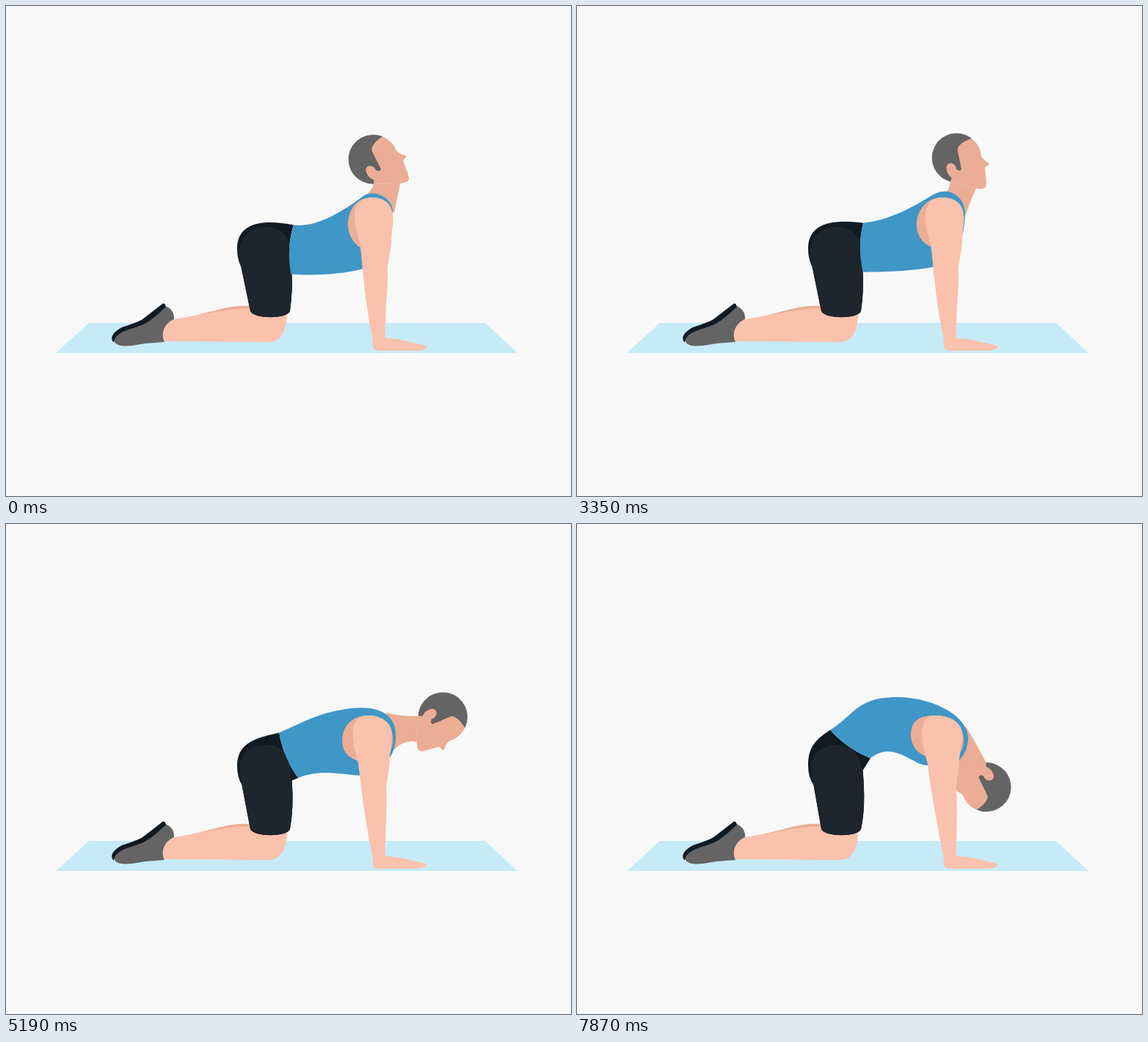
Animation of 770 by 668 pixels, one loop 8000 ms. Source, as an HTML page:

```html
<!DOCTYPE html>
<html lang="en">
<head>
<meta charset="utf-8">
<title>Back stretch</title>
<style>
  html, body { margin: 0; width: 100%; height: 100%; overflow: hidden; background: #f8f8f8; }
  svg { display: block; width: 100%; height: 100%; }
  .skin { fill: #fac1ac; }
  .shade { fill: #ebad95; }
  .grey { fill: #646464; }
  .dark { fill: #101a22; }
  .black { fill: #1c262c; }
  .blue { fill: #3f97c7; }
</style>
</head>
<body>
<svg viewBox="0 0 770 668" xmlns="http://www.w3.org/2000/svg">
  <rect width="770" height="668" fill="#f8f8f8"/>
  <path fill="#c6ebf7" d="M113 432H653L697 473H68Z"/>

  <!-- lower leg and shoe -->
  <path class="shade" d="M232 427C285 418 298 407 334 409V420Z"/>
  <path class="skin" d="M229 427C270 421 300 412 334 412L383 420C382 444 375 458 358 458L215 457C210 445 217 432 229 427Z"/>
  <path class="grey" d="M147 456C150 464 160 464 172 463L190 460L216 458C210 445 217 432 229 427C230 418 224 411 217 409C205 420 195 430 185 434C170 439 150 445 147 456Z"/>
  <path class="dark" d="M146 458C141 451 147 444 158 438C175 432 183 430 190 424L212 407Q216 403 218 410C205 422 195 431 185 435C170 441 149 444 147 458Z"/>

  <path id="shorts" class="dark"/>
  <path id="thigh" class="black"/>
  <path id="neck" class="shade"/>
  <g id="head">
    <path class="shade" d="M13 -31C22 -27 29 -20 31 -13C33 -9 38 -7 44 -5Q47 -3 41 1C43 10 48 18 49 26Q49 31 42 32L37 33L1 33.6L-15 20V-15Z"/>
    <path class="grey" d="M13 -31C6 -27 -1 -20 -2 -13C0 -6 7 4 11 14L8 16L4 15C3 11 -1 9 -4 9C-9 9 -11 14 -9 18C-7 24 -3 26 1 28V33.6A33.6 33.6 0 1 1 13 -31Z"/>
  </g>
  <path id="shirt" class="blue"/>
  <path id="armhole" class="shade"/>
  <path id="arm" class="skin"/>
</svg>
<script>
const LOOP = 8000, START = 2970, STEPS = 92;
const { sin, cos, sqrt, min, floor, PI } = Math;

const $ = id => document.getElementById(id);
const add = ([x, y], dx, dy) => [x + dx, y + dy];
const mid = (a, b) => [(a[0] + b[0]) / 2, (a[1] + b[1]) / 2];

// Path template: points become "x y", numbers stay as they are.
const draw = (id, text, ...values) =>
  $(id).setAttribute('d', String.raw({ raw: text }, ...values.map(v => [v].flat().join(' '))));

// Motion advances three steps every 140 ms: two short, one long.
function stepAt(t) {
  const count = d => 3 * floor(d / 140) + min(2, floor(d % 140 / 20));
  if (t < START) return 0;
  if (t < 3070) return 1;
  if (t < 3790) return 2 + count(t - 3070);
  return min(STEPS, 18 + count(t - 3790));
}

// u runs from 0 (back hollow, head up) to 1 (back round, head down).
function render(u) {
  const early = sqrt(u), late = u * u, bow = sin(PI * u);

  // The head swings about the shoulders while it turns.
  const turn = 181 * u, r = turn * PI / 180;
  const swing = (170 * u - 16 - 4.5 * sin(2 * PI * u)) * PI / 180;
  const reach = 79 + 3 * u - 4 * bow;
  const head = [522 + reach * sin(swing), 285 - reach * cos(swing)];
  const onHead = (x, y) => add(head, x * cos(r) - y * sin(r), x * sin(r) + y * cos(r));
  const nape = onHead(1, 33.6), jaw = onHead(37, 33);
  $('head').setAttribute('transform', `translate(${head}) rotate(${turn})`);

  const collar = [486 + 44 * early, 260 - 7 * bow + 16 * late];
  const throat = [529 - 14 * late, 282 + 40 * sin(u * PI / 2)];
  draw('neck', ['M', 'Q', ' ', 'L', 'Q', ' ', 'Z'],
    nape, add(mid(nape, collar), 3, 4), collar,
    throat, add(mid(throat, jaw), 0, -12 * bow), jaw);

  // The waist tips forward with the pelvis.
  const lean = (58 * u ** 1.25 - 3) * PI / 180, lx = sin(lean), ly = cos(lean);
  const waist = [390 - 17.5 * late, 332 - 32 * u];
  const top = add(waist, -33.5 * lx, -33.5 * ly);
  const low = add(waist, 33.5 * lx, 33.5 * ly);
  const belt = add(waist, -8 * ly, 8 * lx);

  const spine = [487 - 51 * u, 259 - 23 * late];
  const slope = -0.75 * (1 - u) ** 2;
  const along = k => add(spine, k, k * slope);
  const chest = [527 + 6 * early, 280 + 12 * early];
  const belly = [487 - 10 * u, 358 - 29 * u];
  draw('shirt', ['M', 'C', ' ', ' ', 'C', ' ', ' ', 'Q', ' ', 'L', 'C', ' ', ' ', 'Q', ' ', 'Z'],
    top, add(top, 32, 4 - 24 * early), along(-27 - 27 * u), spine,
    along(14 + 34 * early), [chest[0], 261 - 7 * bow], chest,
    add(chest, 0, 17), [524 - 3 * u, 318 + 4 * u],
    belly, add(belly, 13 * u - 32, 9 * (1 - u) - 6 * bow), add(low, 26 + 5 * u, 2 - 27 * u), low,
    belt, top);

  const crotch = [389.5, 365 - 29 * u], seat = [320.5 + 2 * u, 356], front = [391 + 3 * u, 385];
  draw('shorts', ['M', 'C', ' ', ' ', 'Q315 345 ', 'L333 416C338 427 383 427 387 416Q', ' ', 'L', 'Q', ' ', 'Z'],
    top, [350 - 25 * u, 290 + 4 * u], [315, 295 + 9 * u], [315, 331 - 2 * u], seat,
    front, crotch, low, belt, top);
  draw('thigh', ['M', 'C310 318 330 301 355 301C374 301 386 314 387 332L', 'Q', ' 387 416C383 427 338 427 333 416Z'],
    seat, crotch, front);

  // The arm slides back slightly over a planted hand.
  const cap = [500 - 9 * u, 261], back = [475 - 5 * u, 288], bend = [483 - 5 * u, 328];
  const elbow = [520 - 3 * u, 360], biceps = [525 - 4 * u, 322], edge = [527 - 2 * u, 286];
  const hole = [466 - 11 * early, 298 - 11 * late], pit = [bend[0] - 1, 329 - 12 * u];
  draw('armhole', ['M', 'C', ' ', ' ', 'C', ' ', ' ', 'L520 314C531 305 534 264 ', 'Z'],
    cap, add(cap, -22, -1), add(hole, 0, -20), hole,
    add(hole, 0, 18), [hole[0] + 12, pit[1] - 3], pit, cap);
  draw('arm', ['M', 'C', ' ', ' ', 'C', ' ', ' ', 'C',
    ' 489 400 498 445Q500 453 500 464Q501 470 507 470H558Q573 469 573 465' +
    'Q572 462 564 461C550 458 535 453 517 453Q516 446 517 430C518 400 ', ' ', 'C', ' ', ' ', 'C', ' ', ' ', 'C', ' ', ' ', 'Z'],
    cap, add(cap, -16, 0), add(back, 0, -18), back,
    add(back, 1, 17), add(bend, -2, -10), bend, add(bend, 3, 27),
    add(elbow, 1, 20), elbow,
    add(elbow, 0, -10), add(biceps, -1, 18), biceps,
    add(biceps, 1, -14), add(edge, 0, 12), edge,
    add(edge, 0, -16), add(cap, 15, 0), cap);
}

let begin, shown = 0;
function tick(now) {
  begin ??= now;
  const step = stepAt((now - begin) % LOOP);
  if (step !== shown) render((shown = step) / STEPS);
  requestAnimationFrame(tick);
}
render(0);
requestAnimationFrame(tick);
</script>
</body>
</html>
```
